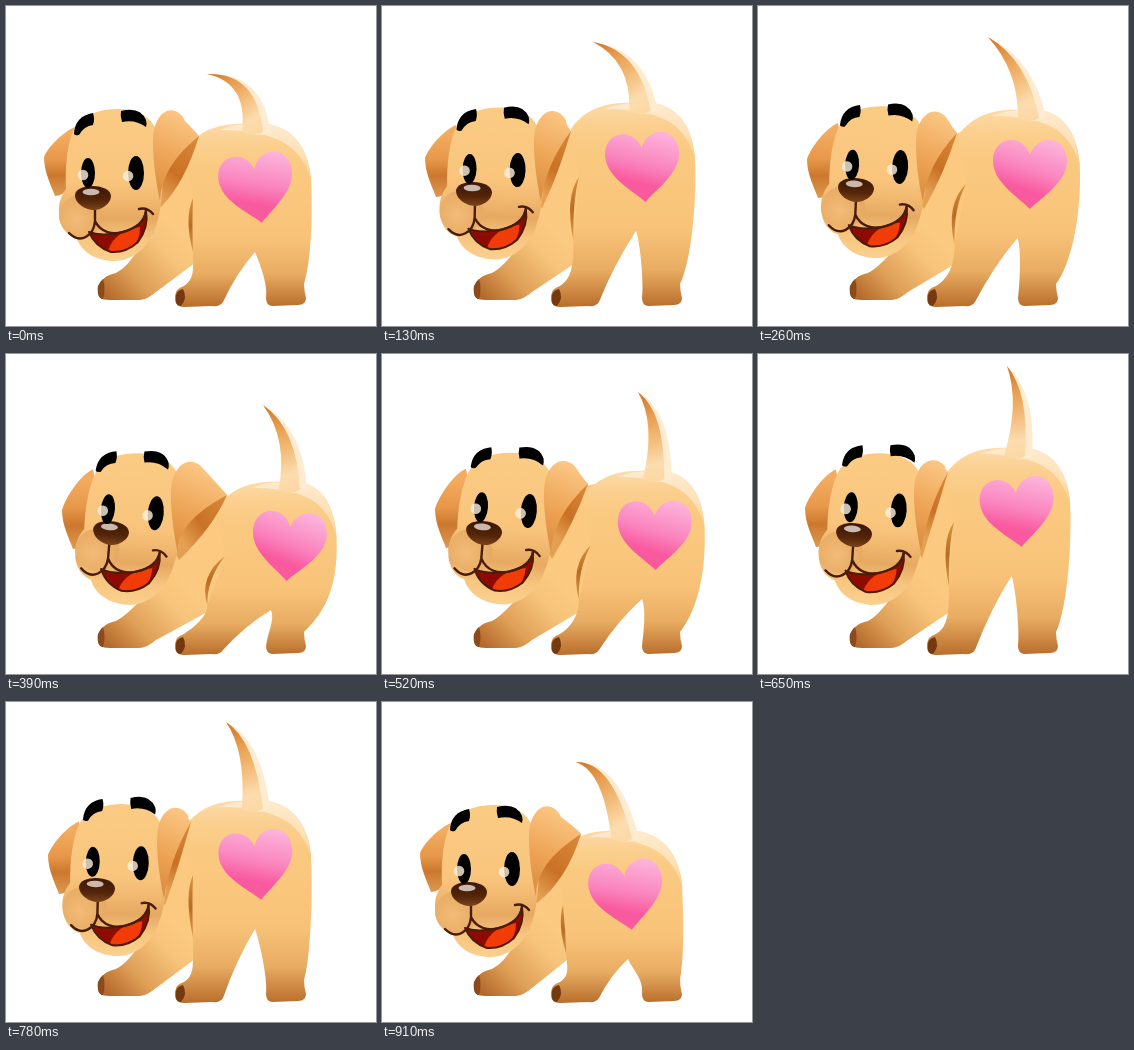
An HTML page with a canvas that plays this animation: 370x320 px, repeating every 1040 ms.

```html
<!DOCTYPE html>
<html lang="en">
<head>
<meta charset="utf-8">
<title>Wagging puppy</title>
<style>
html, body { margin: 0; width: 100%; height: 100%; overflow: hidden; background: #fff; }
canvas { display: block; }
</style>
</head>
<body>
<canvas id="stage" width="370" height="320"></canvas>
<script>
const ctx = document.getElementById('stage').getContext('2d');
const STEP = 130;

// nose x, y | ear drop, brow shift | ear tip from nose | heart x, y, tilt | tail tip | tail bend
const POSES = [
  [87, 191, 0, 0, 106, -61, 251, 182, -8, 201, 68, 258, 66],
  [92, 187, 5, 0, 97, -62, 261, 161, -4, 211, 36, 265, 44],
  [98, 183, 10, 0, 101, -56, 272, 168, 0, 230, 31, 276, 53],
  [105, 178, 18, 3, 116, -37, 283, 192, 4, 257, 51, 298, 74],
  [102, 178, 17, -1, 104, -48, 273, 181, -1, 256, 38, 290, 58],
  [96, 180, 14, -5, 94, -62, 260, 158, -6, 249, 12, 278, 38],
  [91, 187, 6, -6, 94, -67, 251, 163, -7, 220, 20, 256, 38],
  [87, 191, 0, 0, 112, -59, 245, 193, -8, 194, 60, 238, 59]
];

function grad(x0, y0, x1, y1, ...stops) {
  const g = ctx.createLinearGradient(x0, y0, x1, y1);
  stops.forEach(([at, color]) => g.addColorStop(at, color));
  return g;
}

function glow(x, y, r, inner, outer) {
  const g = ctx.createRadialGradient(x, y, 0, x, y, r);
  g.addColorStop(0, inner);
  g.addColorStop(1, outer);
  return g;
}

function fill(d, color) {
  ctx.fillStyle = color;
  ctx.fill(new Path2D(d));
}

function line(d, color, width) {
  ctx.strokeStyle = color;
  ctx.lineWidth = width;
  ctx.lineCap = ctx.lineJoin = 'round';
  ctx.stroke(new Path2D(d));
}

function oval(x, y, rx, ry, color) {
  ctx.fillStyle = color;
  ctx.beginPath();
  ctx.ellipse(x, y, rx, ry, 0, 0, 7);
  ctx.fill();
}

function at(x, y, degrees, paint) {
  ctx.save();
  ctx.translate(x, y);
  ctx.rotate(degrees * Math.PI / 180);
  paint();
  ctx.restore();
}

function drawBody(nx, ny, drop, tipX, tipY, hx, hy) {
  const H = (x, y) => `${hx + x} ${hy + y} `;
  const N = (x, y) => `${nx + x} ${ny + y} `;
  const right = 305 + (hx - 251) * 0.8;
  const crotch = 249 + (hx - 251) * 0.5;
  const crease = 187 + (hx - 251) * 0.45;
  const fold = hy * 0.55 + 146;
  const shoulder = `C${H(31, -68)}${right - 2} ${hy - 43} ${right} ${hy - 8}`;

  // chest and front leg
  fill(`M${H(-40, -55)}L${N(tipX - 3, tipY + 2)}L${N(50, 20)}L${N(45, 52)}
    Q122 261 110 267Q94 270 92 284Q90 294 104 294L134 294Q142 293 150 286
    L${crease + 2} 257L${H(-40, 40)}Z`,
    grad(102, 292, 172, 222, [0, '#b4692b'], [0.35, '#dfa057'], [0.75, '#f8c47c'], [1, '#fbc980']));
  fill('M97 273Q90 279 92 287Q93 293 97 293Q100 283 97 273Z', '#8a4a1c');

  // rump and hind legs
  fill(`M${H(-72, -38)}C${H(-55, -62)}${H(-32, -65)}${H(-5, -64)}${shoulder}
    C${right + 2} ${hy + 45} ${right / 2 + 151} 260 298 278
    Q298 284 300 292Q300 299 292 299L266 300Q260 299 260 292
    C262 277 ${crotch + 4} ${hy + 74} ${crotch} ${hy + 64}
    Q${crotch / 2 + 106} ${hy / 2 + 176} 217 296
    Q214 301 206 300L178 301Q168 301 169 290Q170 282 178 280
    C189 273 ${crease} 262 ${crease} ${fold}L${H(-64, 10)}Z`,
    grad(0, hy - 66, 0, 301, [0, '#fddcac'], [0.12, '#fbcf8e'], [0.25, '#fac980'],
      [0.62, '#f8c379'], [0.82, '#e8ac62'], [1, '#b96d2c']));
  fill('M177 283Q169 285 170 292Q169 300 175 300Q182 292 177 283Z', '#74390f');

  // light on the back
  fill(`M${H(-5, -64)}${shoulder}C${right - 8} ${hy - 36} ${H(28, -58)}${H(-38, -58)}Q${H(-24, -64)}${H(-5, -64)}Z`,
    grad(0, hy - 66, 0, hy - 8, [0, '#feebcf'], [0.6, '#fde0b6'], [1, '#fbcc88']));

  fill(`M${H(-64, 10)}Q${crease - 9} ${hy + 30} ${crease} ${fold}Q${crease - 1} ${hy + 34} ${H(-64, 10)}Z`,
    grad(0, hy + 10, 0, fold, [0, '#d8923f'], [0.5, '#b96c22'], [1, '#d79a50']));

  // shade behind the ear
  fill(`M${N(tipX, tipY)}Q${N(tipX - 14, tipY * 0.4 + 10)}${N(68, 10 + drop)}L${N(54, 0)}L${N(70, -60)}Z`,
    grad(nx + 65, ny, nx + tipX, ny + tipY, [0, '#e4a052'], [0.4, '#c97124'], [1, '#d98a3c']));
}

function drawTail(hx, hy, x, y, bx, by) {
  const root = hx + 13 + (hx - 251) * 0.15;
  const blade = (rightX, leftX) => `M${x} ${y}Q${bx + rightX - root} ${by} ${rightX} ${hy - 56}
    Q${rightX - 10} ${hy - 50} ${leftX} ${hy - 57}Q${bx - 16} ${by + 11} ${x} ${y}Z`;
  fill(blade(root, root - 28), '#feebd0');
  fill(blade(root - 7, root - 28), grad(x, y, hx, hy - 52,
    [0, '#cd7428'], [0.3, '#e9a052'], [0.55, '#f3bd7b'], [0.8, '#fcdcae'], [1, '#fcd7a2']));
}

function drawHeart(x, y, tilt) {
  at(x, y, tilt, () => fill(
    `M0 35C-12 23-37 8-37-13C-37-27-28-34-19-34C-10-34-3-28 0-19
     C3-28 10-34 19-34C28-34 37-27 37-13C37 8 12 23 0 35Z`,
    grad(14, -34, -8, 34, [0, '#fcb2da'], [0.45, '#fa86bf'], [0.75, '#f9599f'], [1, '#f95a9c'])));
}

function drawFarEar(d) {
  fill(`M-18 ${-70 + d * 0.4}C-30 ${-65 + d * 0.4}-45 ${-50 + d * 0.8}-49 ${-40 + d}
    C-49 ${-25 + d}-42 ${-12 + d}-38 ${-1 + d}Q-30 ${-1 + d}-24 ${-10 + d}L-10 -20Z`,
    grad(-34, -62 + d * 0.5, -34, d, [0, '#f3ac5f'], [0.4, '#e7984a'], [0.65, '#cc782e'], [1, '#dd9a52']));
}

function drawNearEar(d, tipX, tipY) {
  const cx = (tipX + 66) / 2 - (tipX - 86) * 0.9;
  const cy = (tipY + d) / 2;
  fill(`M61 ${-68 + d}C68 ${-93 + d * 0.9} 86 ${-90 + d} 92 ${-76 + d * 0.7}
    Q${tipX - 5} ${tipY - 6} ${tipX} ${tipY}Q${cx} ${cy} 67 ${4 + d}
    C62 ${-20 + d} 58 ${-50 + d} 61 ${-68 + d}Z`,
    grad(60, -10 + d, 90, -80 + d, [0, '#df9043'], [0.4, '#eda354'], [1, '#fac481']));
}

function drawFace(drop, shift) {
  const ink = '#4a1c08';
  at(0, drop * 0.4, 0, () => fill(`M-18-70C-8-84 10-88 25-88C50-88 64-76 66-55C72-20 70 10 62 32
    C55 52 38 64 22 64C5 64-10 57-16 42C-24 40-33 32-34 16C-35 4-30-4-27-8C-28-30-26-55-18-70Z`,
    grad(0, -88, 0, 64, [0, '#fbcb84'], [0.48, '#f9c57d'], [0.62, '#f0b66e'],
      [0.72, '#e6a962'], [0.86, '#f7c680'], [1, '#fbd08e'])));

  // muzzle
  oval(-12, 19, 22, 21, glow(-16, 22, 26, '#f2bb77', '#e6aa62'));
  at(-drop * 0.15, drop * 0.15, 0, () => {
    const mouth = 'M-4 35Q8 40 30 35C44 31 52 24 53 14Q56 30 45 45Q33 56 18 55Q2 50-4 35Z';
    fill(mouth, '#8f0b02');
    fill('M15 54Q21 34 47 30Q47 44 39 50Q28 56 15 54Z', '#f23c08');
    line(mouth, ink, 2);
    line('M2 10L2 24C1 38-12 48-24 36M2 24C8 36 20 38 30 35C44 31 52 24 53 13M46 12Q54 10 60 17', ink, 2.4);
  });

  // nose
  fill('M-18-2C-17-14 17-14 18-1C18 7 8 13 1 13C-7 13-18 7-18-2Z',
    grad(0, -11, 0, 13, [0, '#3c1704'], [0.6, '#542509'], [1, '#7b441b']));
  oval(-2, -5, 8.5, 3.3, '#c9b9ae');

  at(0, shift * 0.5, 0, () => {
    oval(-5, -24, 7, 15, '#000');
    oval(43, -24, 8, 17, '#000');
    oval(-10, -22, 5.3, 5.3, 'rgba(255,240,222,.8)');
    oval(35, -21, 5.3, 5.3, 'rgba(255,240,222,.8)');
  });

  // brows
  at(-shift * 0.5, shift, 0, () => {
    fill('M-19-63Q-18-81 0-84Q2-78 0-72Q-9-71-14-62Q-18-61-19-63Z', '#000');
    fill('M28-86Q47-91 53-77Q54-73 53-70Q42-78 29-75Q27-81 28-86Z', '#000');
  });
}

function draw(pose) {
  const [nx, ny, drop, shift, tipX, tipY, hx, hy, tilt, tx, ty, bx, by] = pose;
  ctx.fillStyle = '#fff';
  ctx.fillRect(0, 0, 370, 320);
  drawBody(nx, ny, drop, tipX, tipY, hx, hy);
  drawTail(hx, hy, tx, ty, bx, by);
  drawHeart(hx, hy, tilt);
  at(nx, ny, 0, () => {
    drawFarEar(drop);
    at(0, 0, drop * 0.27, () => drawFace(drop, shift));
    drawNearEar(drop, tipX, tipY);
  });
}

function tick() {
  draw(POSES[Math.floor(performance.now() / STEP) % POSES.length]);
  requestAnimationFrame(tick);
}
tick();
</script>
</body>
</html>
```
